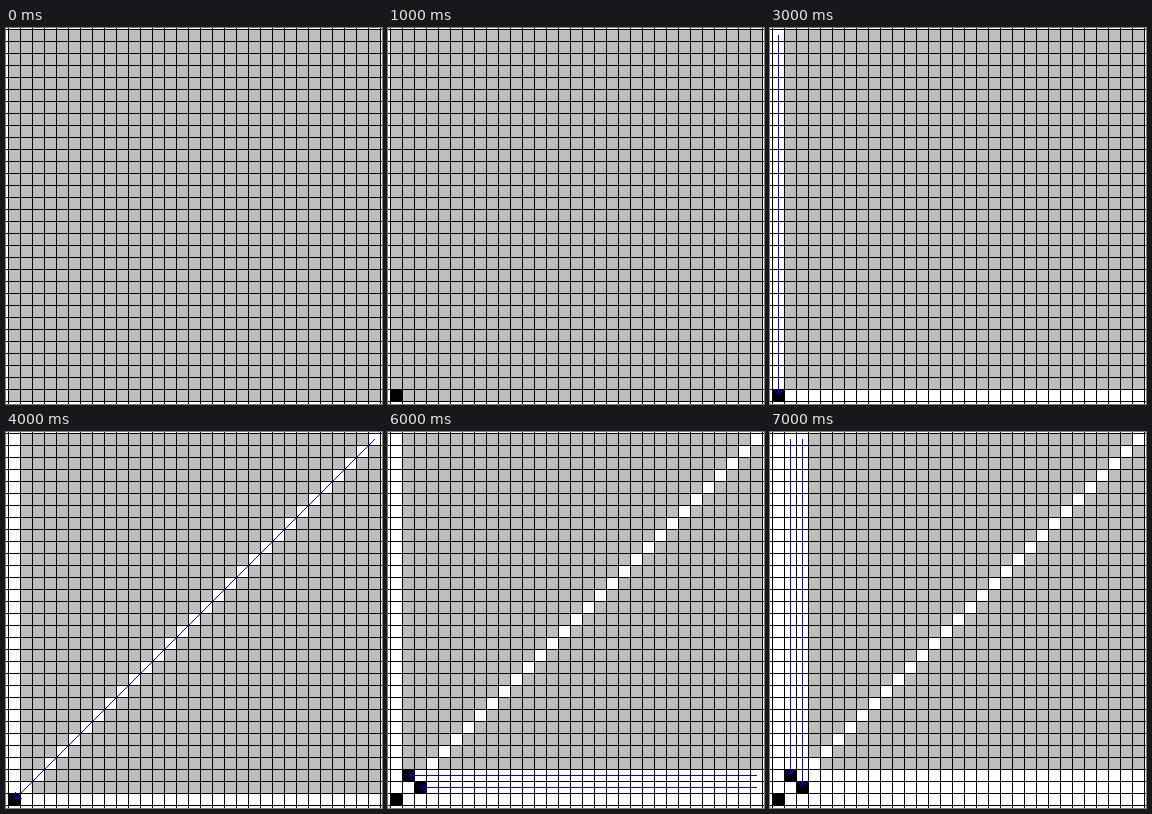
An HTML page with a canvas for the animation above (8 s loop, 376x376 px).

```html
<!DOCTYPE html>
<html lang="en">
<head>
<meta charset="utf-8">
<style>
  html, body { margin: 0; width: 100%; height: 100%; overflow: hidden; background: #fff; }
  canvas { display: block; }
</style>
</head>
<body>
<canvas id="stage" width="376" height="376"></canvas>
<script>
const ctx = document.getElementById('stage').getContext('2d');
const CELLS = 31, PITCH = 12, SIZE = 376, LAST = CELLS - 1;
const GRAY = '#bebebe', WHITE = '#fff', BLACK = '#000', BLUE = '#00f', RED = '#f00';

// Cells are addressed by column from the left and row from the bottom.
const cellX = col => 3 + PITCH * col;
const cellY = row => 2 + PITCH * (LAST - row);
const midX = col => cellX(col) + 5;
const midY = row => cellY(row) + 5;

function cell(col, row, color) {
  ctx.fillStyle = color;
  ctx.fillRect(cellX(col), cellY(row), PITCH - 1, PITCH - 1);
}

const fillRow = row => { for (let c = 0; c < CELLS; c++) cell(c, row, WHITE); };
const fillColumn = col => { for (let r = 0; r < CELLS; r++) cell(col, r, WHITE); };
const fillDiagonal = () => { for (let i = 1; i < CELLS; i++) cell(i, i, WHITE); };

// One-pixel line without smoothing.
function line(x0, y0, x1, y1, color) {
  const steps = Math.max(Math.abs(x1 - x0), Math.abs(y1 - y0));
  ctx.fillStyle = color;
  for (let i = 0; i <= steps; i++) {
    const k = i / steps;
    ctx.fillRect(Math.round(x0 + (x1 - x0) * k), Math.round(y0 + (y1 - y0) * k), 1, 1);
  }
}

function arrow(x0, y0, x1, y1, color) {
  line(x0, y0, x1, y1, color);
  const angle = Math.atan2(y0 - y1, x0 - x1), length = 4 * Math.SQRT2;
  for (const turn of [-Math.PI / 4, Math.PI / 4]) {
    line(x1, y1,
      Math.round(x1 + length * Math.cos(angle + turn)),
      Math.round(y1 + length * Math.sin(angle + turn)), color);
  }
}

const sweepLeft = (col, row) =>
  arrow(midX(LAST), midY(row), midX(col) + 1, midY(row), BLUE);
const sweepDown = (col, row) =>
  arrow(midX(col), midY(LAST), midX(col), midY(row) - 1, BLUE);

function redArrows(col, row) {
  arrow(midX(col), midY(row), midX(0) + 1, midY(row), RED);
  arrow(midX(col), midY(row), midX(col), midY(0) - 1, RED);
}

function draw(step) {
  ctx.fillStyle = WHITE;
  ctx.fillRect(0, 0, SIZE, SIZE);
  ctx.fillStyle = GRAY;
  ctx.fillRect(2, 1, PITCH * CELLS, PITCH * CELLS);
  ctx.fillStyle = BLACK;
  for (let i = 0; i <= CELLS; i++) {
    ctx.fillRect(2 + PITCH * i, 0, 1, SIZE);
    ctx.fillRect(0, 1 + PITCH * i, SIZE, 1);
  }

  if (step >= 2) fillRow(0);
  if (step >= 3) fillColumn(0);
  if (step >= 4) fillDiagonal();
  if (step >= 6) { fillRow(1); fillRow(2); }
  if (step >= 7) { fillColumn(1); fillColumn(2); }

  if (step >= 1) cell(0, 0, BLACK);
  if (step >= 5) { cell(1, 2, BLACK); cell(2, 1, BLACK); }

  if (step === 2) sweepLeft(0, 0);
  if (step === 3) sweepDown(0, 0);
  if (step === 4) arrow(midX(LAST), midY(LAST), midX(0) + 1, midY(0) - 1, BLUE);
  if (step === 5) { redArrows(1, 2); redArrows(2, 1); }
  if (step === 6) { sweepLeft(1, 2); sweepLeft(2, 1); }
  if (step === 7) { sweepDown(1, 2); sweepDown(2, 1); }
}

const start = performance.now();
let shown = -1;
function tick() {
  const step = Math.floor((performance.now() - start) / 1000) % 8;
  if (step !== shown) draw(shown = step);
  requestAnimationFrame(tick);
}
tick();
</script>
</body>
</html>
```
